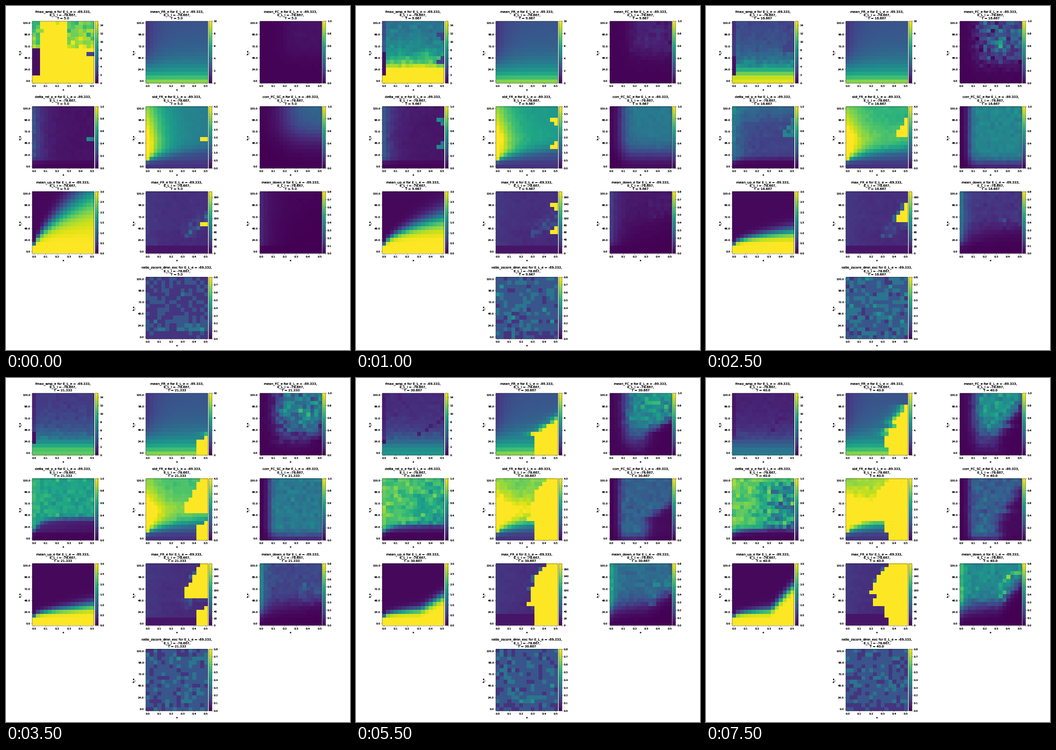
A matplotlib script that plays this animation: 748 by 748 pixels, repeating every 8000 ms.

```python
import numpy as np
import matplotlib.pyplot as plt
from matplotlib.animation import FuncAnimation
from matplotlib.patches import Rectangle

SIZE, N, FRAMES = 748, 16, 16
BOX = 134.5
LEFT, TOP, COL_STEP, ROW_STEP = 57, 33, 247.3, 185.5
PT = .592  # pixels per typographic point
INK_PASSES = 3

plt.rcParams["font.family"] = "DejaVu Sans"

# name, column, row, colour scale maximum, tick step, tick format
PANELS = [
    ("fmax_amp_e", 0, 0, 15, 2, "%d"),
    ("mean_FR_e", 1, 0, 10, 2, "%d"),
    ("mean_FC_e", 2, 0, 1, .2, "%.1f"),
    ("delta_rel_p_e", 0, 1, 1, .2, "%.1f"),
    ("std_FR_e", 1, 1, 4, .5, "%.1f"),
    ("corr_FC_SC_e", 2, 1, 1, .2, "%.1f"),
    ("mean_up_e", 0, 2, 3, .5, "%.1f"),
    ("max_FR_e", 1, 2, 175, 20, "%d"),
    ("mean_down_e", 2, 2, .8, .1, "%.1f"),
    ("ratio_zscore_dmn_exc", 1, 3, .8, .1, "%.1f"),
]

# u counts cells along a, v counts cells along b_e
v, u = np.mgrid[0:N, 0:N].astype(float)


def sigmoid(x):
    return 1 / (1 + np.exp(-np.clip(x, -40, 40)))


def bell(x, center, width):
    return np.exp(-((x - center) / width) ** 2)


def fade(t, scale):
    return np.exp(-t / scale)


def period_at(t):
    return 5 + 35 * t


def runaway_edge(t, jitter):
    """First column of the runaway firing region, growing from the lower right."""
    start = 10.4 + 31 * max(0, .55 - t)
    knee = min(5, 3 + 7.5 * (t - .467))
    slope = max(.75, 3.1 - 2.35 * t)
    return np.round(start + slope * np.maximum(0, v - knee) + .7 * t ** 6 * jitter)


def spike_mask(t, edge, jitter):
    """Two small seeds first, then a wedge that spreads leftwards."""
    if t < .3:
        low = np.interp(t, (0, .133, .267), (7, 5.4, 8))
        high = 11.4 + 4 * max(0, t - .1)
        seed = (2.4 + 40 * max(0, t - .2)) * bell(v, low, .65 + t)
        seed += 2.4 * bell(v, high, .7) * (t > .05)
        return u >= np.round(N - seed)
    tip = np.interp(t, (.333, .467, .733, 1), (13, 10, 8.6, 7))
    base = max(4, 6.5 - 9.4 * (t - .467))
    wedge = tip + .65 * np.maximum(0, v - 9) + .6 * jitter
    return ((u >= np.round(wedge)) & (v > base)) | ((u >= edge) & (v < 6))


def frequency(t, spike, edge, noise, rng):
    falloff = .2 + .8 / (1 + (v / 3.4) ** 2.2)
    f = 16 / period_at(t) * falloff * (1 + noise(.07) * (v > 3))
    f *= 1 + .5 * fade(t, .04) * ((u < 9) | (v < 9))
    left = u < max(.5, 1.9 - 8 * t)
    f *= 1 - .4 * left * (v > 3)
    f[left & (v >= 2 + (t > .4)) & (v <= 8 - 5.5 * t)] = .04
    if t < .4:
        f[spike] = .2
    f[(edge - u == 1) & (v > 4) & (v < 11) & (rng.random((N, N)) < .6)] = .08
    return f


def firing_rate(t, edge, noise):
    f = .25 + .57 * np.exp(-v / 4)
    f *= 1 - .42 * np.exp(-u / 2.8) * sigmoid((v - 4.5) / 1.2)
    gap = np.maximum(edge - u, 0)
    f += (.4 + noise(.1)) * np.exp(-(gap - 1) / 1.2) * ((v > 4) & (v < 13))
    f[u >= edge] = 1
    return f


def connectivity(t, clear, noise):
    f = .02 + .49 * sigmoid((t - .33) / .1) * (1 + noise(.15 + .35 * bell(t, .3, .2)))
    f *= sigmoid((u - 3.7 - 2.3 * fade(t, .2)) / .8)
    f *= sigmoid((v - 2.2 - 4.3 * bell(t, 0, .45)) / 1.1)
    f *= .45 + .55 * sigmoid((v - 6.3) / 1.2)
    return .01 + f * clear


def delta_power(t, spike, noise, rng):
    onset = sigmoid((t - .4) / .05)
    f = .05 + .63 * onset + .05 * t
    f = f + (.2 * (1 - onset) + .05 * t) * np.exp(-u / 2.2)
    f += .25 * bell(t, .27, .08) * sigmoid((v - 12.5) / 1.2)
    f *= 1 + noise(.07)
    ragged = sigmoid((u - 8) / 1.2) * sigmoid((14.2 - v) / 1.5)
    f -= .6 * max(0, t - .5) * ragged * rng.uniform(0, 1.8, (N, N))
    lag = sigmoid((t - .38) / .03) * max(1.1, 3.9 - 7 * (t - .467))
    floor = .01 + .09 * sigmoid((v - 1.6) / .3) * np.exp(-u / 25)
    f = floor + (f - floor) * sigmoid((v - 1.5 - lag * (1 - .8 * np.exp(-u / 2))) / .35)
    if t < .4:
        f[spike] = .45 + noise(.07)[spike]
    return f


def rate_spread(t, spike, edge, noise):
    plateau = 1.75 + 1.6 * t ** .7
    crest = 4.3 - .12 * np.maximum(0, v - 7)
    f = plateau + (crest - plateau) * np.exp(-(u / 4.3) ** 1.2)
    f += .8 * t * bell(v, 7.5, 3) + .4 * t * sigmoid((u - 8) / 2)
    root = np.sqrt(u / 15)
    lift = sigmoid((v - 1.5 - 2.4 * root) / (.3 + .7 * root))
    f = .55 + .06 * v * (v < 3) + (f - .6) * lift + noise(.02 + .08 * t) * (v > 3)
    f /= 4
    f[spike | (u >= edge)] = 1
    return f


def structure_match(t, clear, noise):
    f = (.3 + .16 * bell(t, .3, .25)) * (1 + noise(.02 + .1 * t))
    f *= sigmoid((u - 2 - 4.5 * fade(t, .08)) / (.5 + 1.5 * fade(t, .1)))
    f *= sigmoid((v - .5 - 7.5 * fade(t, .15)) / (.7 + 1.2 * fade(t, .2)))
    f += .1 * t * bell(v, 2, 2) * (u > 2)
    return f * (1 - (1 - clear) * np.clip(4 * (t - .5), 0, .92))


def turning_row(t):
    """Row at which active states give way to silent ones."""
    climb = (2 + 11.2 * fade(t, .16)) * (u / 15) ** (.4 + .35 * fade(t, .3))
    return 1.8 + climb + 1.8 * max(0, t - .43) * np.maximum(0, u - 9.5)


def active_time(t, turn):
    f = .02 + sigmoid((turn - v) / (.3 + u / 15 * (.4 + 2.7 * fade(t, .12))))
    f[:2] = 1
    return f


def peak_rate(t, spike, noise, rng):
    f = .135 + .03 * np.exp(-u / 3) - .02 * sigmoid((u - 4) / 2) * (v < 6) + noise(.006)
    f[v < 1.5 + t] = .055
    near = bell(v, 7 + .8 * (u - 13), 2) * (u > 8) * (v > 3)
    f += np.abs(noise(.11 - .07 * t)) * near
    rim = np.zeros_like(spike)
    rim[:, :-1] = spike[:, 1:]
    f[rim & (v > 4) & (rng.random((N, N)) < .4)] = .3
    f[spike] = 1
    return f


def silent_time(t, turn, noise, rng):
    f = (.02 + .46 * t ** 1.1) * (1 + noise(.08))
    f *= sigmoid((v - turn - 1.8 + 2.5 * fade(t, .1)) / (1.1 + 2.8 * fade(t, .2)))
    side = (.08 + .15 * sigmoid((t - .2) / .05)) * np.exp(-u / (.9 + 1.2 * fade(t, .2)))
    f += side * sigmoid((v - 1.5 - 2.5 * t) / (.2 + .8 * t))
    fringe = (u > 9) & (v > turn + .5) & (v < turn + 6)
    f += np.abs(noise(.13 * t)) * fringe
    f[fringe & (rng.random((N, N)) < .3 * (t - .8))] = 1
    return f


def zscore_ratio(t, noise):
    level = .95 + .5 * bell(t, .25, .15) - .6 * fade(t, .03) + noise(.6)
    level += fade(t, .05) * bell(v, 2, 1.2) * (.6 + 1.4 * bell(u, 11.5, 2.5))
    level += .9 * bell(t, .65, .12) * (v < 4) * (abs(u - 8.5) < 5)
    level -= .8 * abs(np.cos(np.pi * t)) * (v < 1.5)
    return .15 + .118 * np.clip(np.round(level), 0, 3)


def fields(step):
    """All ten maps at one step, scaled to 0..1, lowest b_e first."""
    t = step / (FRAMES - 1)
    rng = np.random.default_rng(40 + step)

    def noise(amount):
        return amount * rng.normal(size=(N, N))

    jitter = rng.uniform(-1, 1, (N, 1))
    edge = runaway_edge(t, jitter)
    spike = spike_mask(t, edge, jitter)
    clear = sigmoid((edge - u - 1) / .7)
    turn = turning_row(t)
    return [np.clip(f, 0, 1) for f in (
        frequency(t, spike, edge, noise, rng),
        firing_rate(t, edge, noise),
        connectivity(t, clear, noise),
        delta_power(t, spike, noise, rng),
        rate_spread(t, spike, edge, noise),
        structure_match(t, clear, noise),
        active_time(t, turn),
        peak_rate(t, spike, noise, rng),
        silent_time(t, turn, noise, rng),
        zscore_ratio(t, noise),
    )]


fig = plt.figure(figsize=(SIZE / 72, SIZE / 72), dpi=72, facecolor="white")
ax = fig.add_axes([0, 0, 1, 1])
ax.set(xlim=(0, SIZE), ylim=(SIZE, 0))
ax.axis("off")


def label(x, y, text, points=10, **style):
    # Overprinting gives the heavy, hard-edged lettering
    return [ax.text(x, y, text, fontsize=points * PT, color="black", **style)
            for _ in range(INK_PASSES)]


def line(x0, y0, x1, y1):
    ax.plot([x0, x1], [y0, y1], color="black", lw=.8 * PT)


def heatmap(data, x, y, width):
    ax.add_patch(Rectangle((x, y), width, BOX, fill=False, ec="black",
                           lw=.8 * PT, zorder=3))
    return ax.imshow(data, extent=(x, x + width, y + BOX, y), cmap="viridis",
                     vmin=0, vmax=1, aspect="auto", interpolation="nearest")


def make_panel(name, col, row, top, step, fmt):
    x, y = LEFT + col * COL_STEP, TOP + row * ROW_STEP
    bottom, cell = y + BOX, BOX / N
    tick, pad = 3.5 * PT, 7 * PT
    image = heatmap(np.zeros((N, N)), x, y, BOX)
    for i in range(6):
        offset = (3 * i + .5) * cell
        line(x + offset, bottom, x + offset, bottom + tick)
        label(x + offset, bottom + pad, f"{i / 10:.1f}", ha="center", va="top")
        line(x - tick, bottom - offset, x, bottom - offset)
        label(x - pad, bottom - offset, f"{24 * i:.1f}", ha="right",
              va="center_baseline")
    label(x + BOX / 2, bottom + 21 * PT, "a", ha="center", va="top")
    label(x - 26.4, y + BOX / 2, "b_e", ha="center", va="center", rotation=90)

    bar, width = x + BOX + 3.6 * PT, BOX / 20
    heatmap(np.linspace(1, 0, 256)[:, None], bar, y, width)
    for value in np.arange(0, top + step / 100, step):
        height = bottom - BOX * value / top
        line(bar + width, height, bar + width + tick, height)
        label(bar + width + pad, height, fmt % value, ha="left",
              va="center_baseline")
    title = label(x + BOX / 2, y - 6 * PT, "", 12, ha="center", va="baseline")
    return image, title


panels = [make_panel(*spec) for spec in PANELS]


def update(step):
    period = round(period_at(step / (FRAMES - 1)), 3)
    for (name, *_), (image, title), data in zip(PANELS, panels, fields(step)):
        image.set_data(data[::-1])
        for text in title:
            text.set_text(f"{name} for E_L_e = -69.333,\nE_L_i = -78.667,\nT = {period}")


animation = FuncAnimation(fig, update, frames=FRAMES, interval=500,
                          repeat=True, repeat_delay=0)
plt.show()
```
